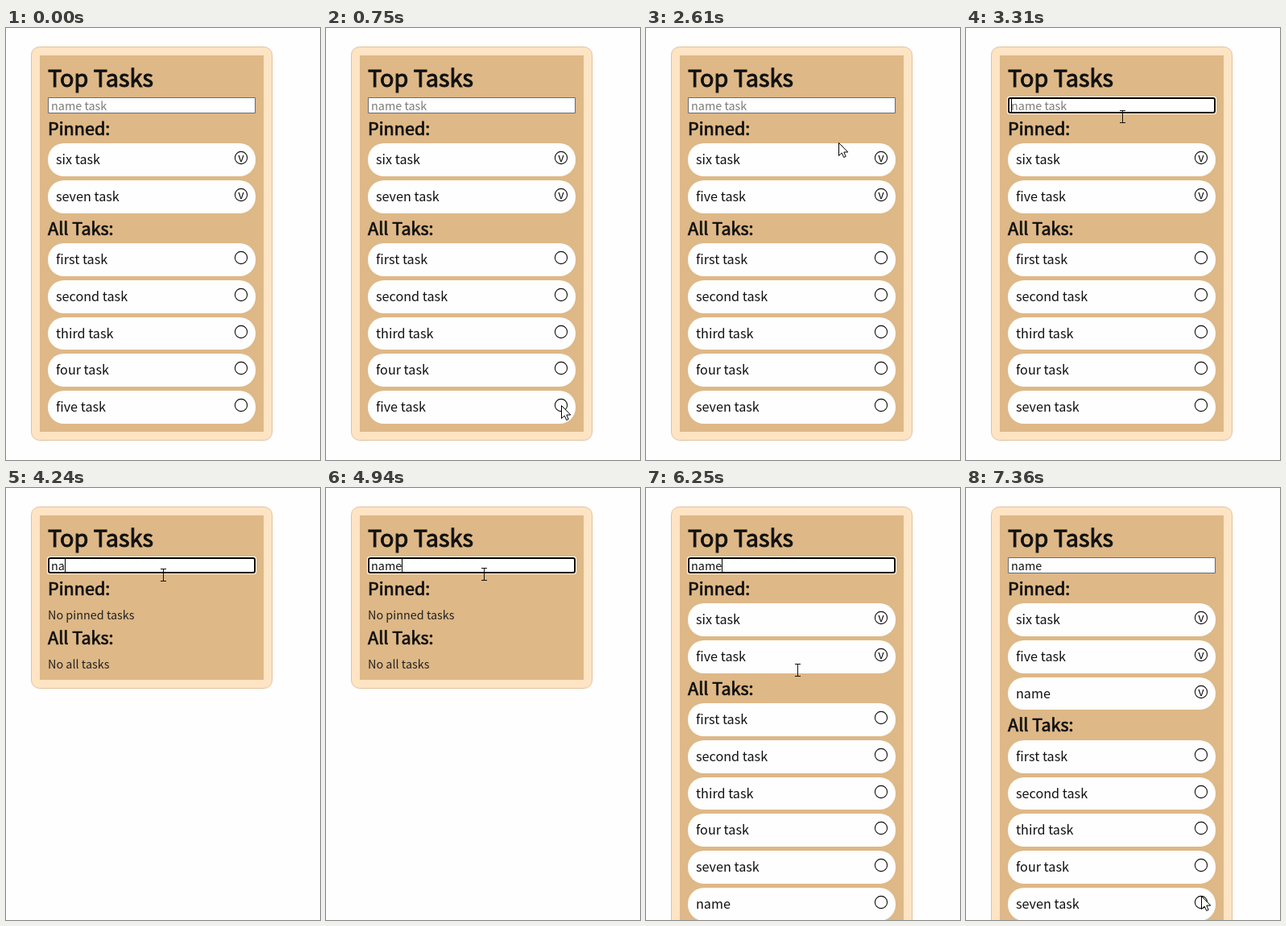
Animation of 390 by 536 pixels, one loop 7.46 s. Source, as an HTML page with a canvas:

```html
<!DOCTYPE html>
<html lang="en">
<head>
<meta charset="utf-8">
<title>Top Tasks</title>
<style>
  html, body { margin: 0; width: 100%; height: 100%; overflow: hidden; background: #fefefe; }
  canvas { display: block; }
</style>
</head>
<body>
<canvas id="stage" width="390" height="536"></canvas>
<script>
const ctx = document.getElementById('stage').getContext('2d');
const LOOP = 7460;
const FONT = '"Noto Sans CJK JP", "Noto Sans CJK SC", "Noto Sans CJK KR", "Noto Sans", sans-serif';
const PAPER = '#fefefe', INK = '#111';
const PITCH = 45.75, PILL = 40.75;

// Moments of the user's actions
const PIN_FIVE = 850, UNPIN_SEVEN = 2000, FOCUS = 3000, ENTER = 5150, PIN_NAME = 6900;
const KEYS = [4000, 4200, 4400, 4600];

// Places where the pointer rests or turns: time, x, y
const PATH = [
  [0, 420, 420], [50, 400, 430], [700, 292, 468], [1100, 292, 468],
  [1756, 286, 208], [2250, 288, 205], [2893, 206, 98], [3080, 204, 99],
  [3310, 194, 110], [4940, 196, 107], [5600, 196, 107], [6250, 188, 226],
  [6750, 292, 506], [LOOP, 292, 506]
];

function pointerAt(t) {
  const i = Math.max(1, PATH.findIndex(p => p[0] > t));
  const [t0, x0, y0] = PATH[i - 1], [t1, x1, y1] = PATH[i];
  const k = (t - t0) / (t1 - t0), e = k * k * (3 - 2 * k);
  return [Math.round(x0 + (x1 - x0) * e), Math.round(y0 + (y1 - y0) * e)];
}

function stateAt(t) {
  const pinned = ['six task'];
  const all = ['first task', 'second task', 'third task', 'four task'];
  (t < UNPIN_SEVEN ? pinned : all).push('seven task');
  (t < PIN_FIVE ? all : pinned).push('five task');
  if (t >= ENTER) (t < PIN_NAME ? all : pinned).push('name');
  const typed = 'name'.slice(0, KEYS.filter(k => t >= k).length);
  const match = s => t >= ENTER || s.includes(typed);
  return { typed, pinned: pinned.filter(match), all: all.filter(match) };
}

function text(s, x, y, size, color = INK, bold = false) {
  ctx.font = `${size}px ${FONT}`;
  ctx.fillStyle = ctx.strokeStyle = color;
  ctx.fillText(s, x, y);
  if (bold) {
    ctx.lineWidth = size / 29;
    ctx.lineJoin = 'miter';
    ctx.strokeText(s, x, y);
  }
}

function box(x, y, w, h, r, fill, stroke, line = 1) {
  ctx.beginPath();
  ctx.roundRect(x, y, w, h, r);
  ctx.fillStyle = fill;
  ctx.fill();
  if (stroke) {
    ctx.strokeStyle = stroke;
    ctx.lineWidth = line;
    ctx.stroke();
  }
}

function task(name, top, pinned) {
  const y = Math.round(top);
  box(52, y, 258, Math.round(top + PILL) - y, 20, PAPER);
  text(name, 62, y + 26, 16.2);
  ctx.beginPath();
  ctx.arc(292, y + 18, 7.6, 0, 7);
  ctx.strokeStyle = INK;
  ctx.lineWidth = 1.1;
  ctx.stroke();
  if (pinned) {
    ctx.textAlign = 'center';
    text('v', 292, y + 23, 14.4);
    ctx.textAlign = 'left';
  }
}

// Draws one list below a heading centred on mid
function section(title, empty, list, mid, pinned) {
  text(title, 52, Math.floor(mid) + 8, 21.6, INK, true);
  if (!list.length) text(empty, 52, mid + 38, 14.4, '#222');
  list.forEach((name, i) => task(name, mid + 18 + i * PITCH, pinned));
}

function input(t, typed) {
  const focused = t >= FOCUS && t < PIN_NAME;
  if (focused) {
    box(51, 85, 260, 22, 3, '#fff');
    box(53, 87, 256, 18, 2, '#fff', '#000', 2);
  } else {
    box(52.5, 86.5, 257, 19, 0, PAPER, '#6b6b6b');
  }
  text(typed || 'name task', 56, 102, 14.4, typed ? INK : '#7c7c78');
  const since = t - Math.max(...[FOCUS, ...KEYS, ENTER].filter(k => k <= t));
  if (focused && since % 1060 < 530) {
    const x = 56 + Math.round(typed ? ctx.measureText(typed).width : 0);
    ctx.fillStyle = '#000';
    ctx.fillRect(x, 88, 1, 16);
  }
}

function pointer(x, y) {
  const beam = x > 52 && x < 280 && (y > 86 && y < 140 || y > 146);
  ctx.save();
  ctx.translate(x, y);
  if (beam) {
    ctx.fillStyle = INK;
    ctx.fillRect(0, -8, 1, 16);
    for (const edge of [-8, 7]) {
      ctx.fillRect(-3, edge, 3, 1);
      ctx.fillRect(1, edge, 3, 1);
    }
  } else {
    const arrow = new Path2D('M.5 .5V16.5L4.2 13L6.7 18.5L9.2 17.4L6.8 12H11.8Z');
    ctx.fillStyle = '#fff';
    ctx.fill(arrow);
    ctx.strokeStyle = '#000';
    ctx.lineWidth = 1;
    ctx.stroke(arrow);
  }
  ctx.restore();
}

function draw(t) {
  const { typed, pinned, all } = stateAt(t);
  const allMid = 125 + (pinned.length ? 32.5 + pinned.length * PITCH : 61);
  const bottom = Math.round(allMid + (all.length ? 23 + all.length * PITCH : 52));

  ctx.fillStyle = PAPER;
  ctx.fillRect(0, 0, 390, 536);
  box(31.5, 23.5, 299, bottom - 13, 10, '#ffe4c4', '#e2c09a');
  box(42, 34, 278, bottom - 34, 0, '#deb887');

  text('Top Tasks', 52, 73, 28.8, INK, true);
  input(t, typed);
  section('Pinned:', 'No pinned tasks', pinned, 125, true);
  section('All Taks:', 'No all tasks', all, allMid, false);
  pointer(...pointerAt(t));
}

const start = performance.now();
function tick() {
  draw((performance.now() - start) % LOOP);
  requestAnimationFrame(tick);
}
tick();
</script>
</body>
</html>
```
